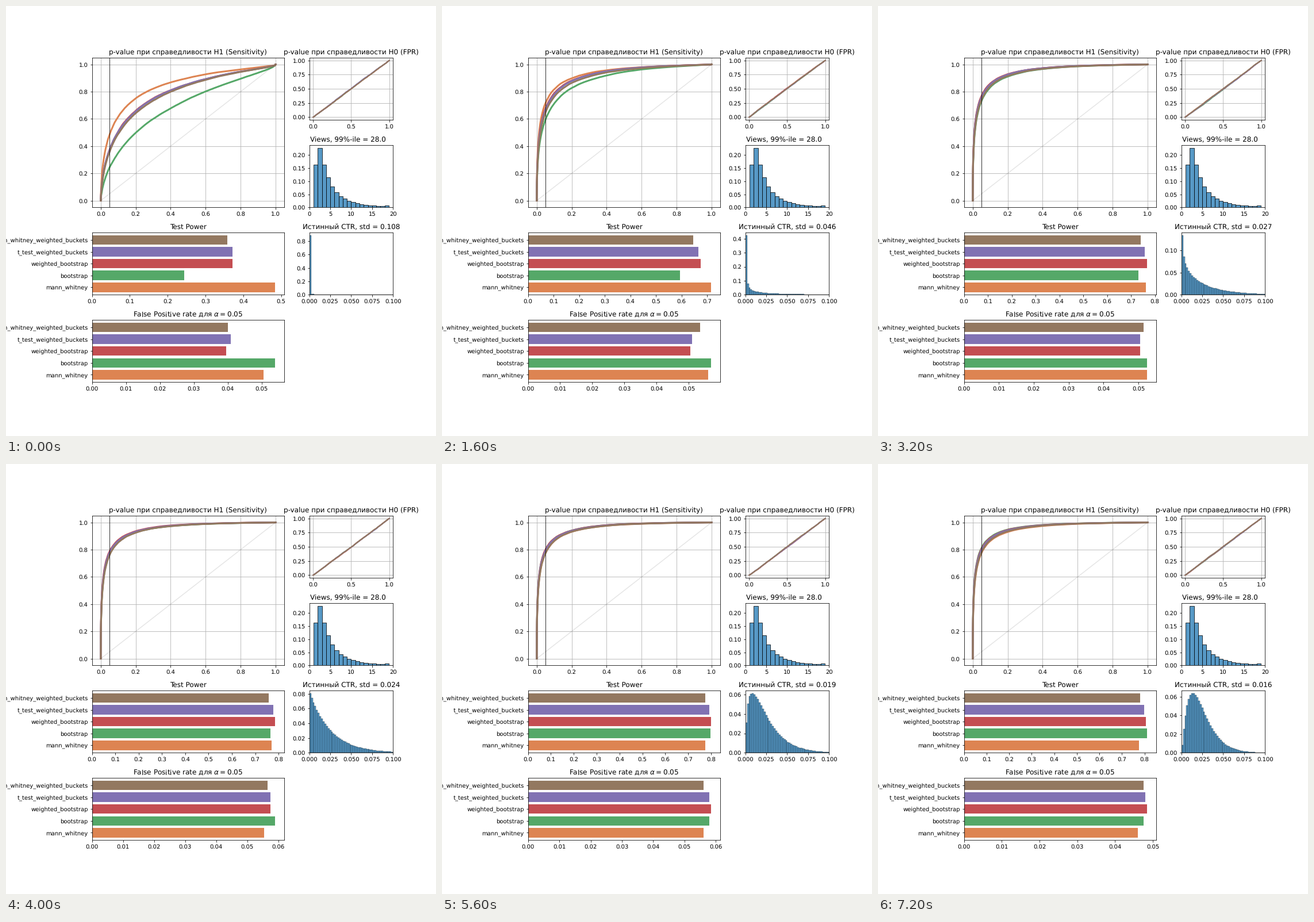
Recreate the animation shown at these times as a matplotlib script. Size 748 by 748 pixels, loop 8000 ms.

```python
import math

import numpy as np
import matplotlib.pyplot as plt
from matplotlib.animation import FuncAnimation
from matplotlib.colors import to_rgba

plt.rcParams["font.family"] = "DejaVu Sans"
plt.rcParams["text.hinting"] = "none"

DPI = 72
SIDE = 748.01 / DPI
STEPS = 10
ALPHA = 0.05
MEAN_CTR = 0.0243
HIST_FACE = to_rgba("#1f77b4", 0.75)

# Name, colour, first power, final power, rate of approach.
TESTS = [
    ("mann_whitney", "#dd8452", 0.484, 0.775, 0.80),
    ("bootstrap", "#55a868", 0.243, 0.820, 0.47),
    ("weighted_bootstrap", "#c44e52", 0.372, 0.807, 0.60),
    ("t_test_weighted_buckets", "#8172b3", 0.372, 0.800, 0.58),
    ("mann_whitney_weighted_buckets", "#937860", 0.357, 0.783, 0.57),
]
NAMES = [t[0] for t in TESTS]
COLORS = [t[1] for t in TESTS]

# Steepness and bend of the power curves on the normal-quantile scale.
COMMON_SHAPE = np.array([0.965, 0.073])
OWN_SHAPE = {"mann_whitney": (0.95, 0.085), "bootstrap": (0.89, 0.043)}


def norm_cdf(z):
    return np.array([0.5 * (1 + math.erf(v / math.sqrt(2))) for v in z])


Z = np.linspace(-4, 3.6, 1500)
P = norm_cdf(Z)


def quantile(p):
    return np.interp(p, P, Z)


def to_trials(rates):
    return np.round(np.array(rates) * 2000) / 2000


def powers(i):
    return to_trials([end - (end - start) * math.exp(-rate * i)
                      for _, _, start, end, rate in TESTS])


def false_positives(i):
    level = np.interp(i, [0, 1, 2, 3, 5, 7, 9],
                      [0.0443, 0.055, 0.0522, 0.0434, 0.057, 0.0572, 0.0468])
    fade = math.exp(-i / 3)
    weighted = 0.002 - 0.007 * fade
    offsets = [0.006 * (-1) ** i * math.exp(-i / 4),
               0.0095 * fade,
               weighted,
               weighted + 0.002 * fade - 0.0005,
               -0.0045 * math.cos(i) * math.exp(-i / 6)]
    return to_trials(level + np.array(offsets))


def view_bins():
    """Shares of 1 + floor(lognormal); the last bin holds two counts."""
    cdf = np.r_[0, norm_cdf(np.log(np.arange(1, 20)) - 1)]
    shares = np.diff(cdf) / cdf[-1]
    return np.r_[shares[:17], shares[17:].sum()]


def ctr_bins(i):
    """Bin masses and spread of a beta distribution that tightens by step."""
    b = max(1, 5 * i) if i < 2 else 10 * (i - 1)
    b += 5 * max(0, i - 7)
    a = MEAN_CTR * b / (1 - MEAN_CTR)
    edges = np.linspace(0, 0.1, 51)
    mid = (edges[1:] + edges[:-1]) / 2
    scale = math.exp(math.lgamma(a + b) - math.lgamma(a + 1) - math.lgamma(b))
    mass = 1.035 * scale * np.diff(edges ** a) * (1 - mid) ** (b - 1)
    std = math.sqrt(MEAN_CTR * (1 - MEAN_CTR) / (a + b + 1))
    return edges[:-1], mass, std


def bridge(rng, n=1000):
    walk = np.r_[0, np.cumsum(rng.normal(size=n))] / math.sqrt(n)
    return walk - np.linspace(0, 1, n + 1) * walk[-1]


def sample_noise(p, noise):
    return np.interp(p, np.linspace(0, 1, len(noise)), noise)


def power_curve(power, shape, noise):
    d = Z - quantile(ALPHA)
    y = norm_cdf(quantile(power) + shape[0] * d - shape[1] * d * d)
    wobble = sample_noise(y, noise)
    y = y + wobble - np.interp(ALPHA, P, wobble) * np.exp(-(d / 0.4) ** 2)
    y = np.maximum.accumulate(np.clip(y, 0, 1))
    return np.r_[0, P, 1], np.r_[0, y, 1]


def null_curve(noise):
    x = np.linspace(0, 1, 500)
    y = x + sample_noise(x, noise)
    return x, np.maximum.accumulate(np.clip(y, 0, 1))


fig = plt.figure(figsize=(SIDE, SIDE), dpi=DPI, facecolor="white")
grid = fig.add_gridspec(4, 3, left=0.2, right=0.9, top=0.88, bottom=0.125,
                        wspace=0.3, hspace=0.4)
ax_h1 = fig.add_subplot(grid[:2, :2])
ax_h0 = fig.add_subplot(grid[0, 2])
ax_views = fig.add_subplot(grid[1, 2])
ax_ctr = fig.add_subplot(grid[2, 2])
ax_power = fig.add_subplot(grid[2, :2])
ax_fpr = fig.add_subplot(grid[3, :2])


def draw_curves(i, power):
    rng = np.random.default_rng(40 + i)
    shared_h1, shared_h0 = bridge(rng), bridge(rng)
    blend = min(i / 4, 1) ** 2
    for name, color, p in zip(NAMES, COLORS, power):
        own = np.array(OWN_SHAPE.get(name, COMMON_SHAPE))
        shape = own + (COMMON_SHAPE - own) * blend
        n1 = 0.004 * shared_h1 + 0.004 * bridge(rng)
        n0 = 0.008 * shared_h0 + 0.008 * bridge(rng)
        ax_h1.plot(*power_curve(p, shape, n1), color=color, lw=3)
        ax_h0.plot(*null_curve(n0), color=color, lw=2)
    ax_h1.plot([0, 1], [0, 1], color="k", alpha=0.1, lw=1.5)
    ax_h1.axvline(ALPHA, color="k", lw=0.8)
    for ax in (ax_h1, ax_h0):
        ax.set_xlim(-0.05, 1.05)
        ax.set_ylim(-0.05, 1.05)
        ax.grid(True)
    ax_h1.set_title("p-value при справедливости H1 (Sensitivity)")
    ax_h0.set_title("p-value при справедливости H0 (FPR)")


def draw_bars(ax, values, title):
    ax.barh(range(len(NAMES)), values, color=COLORS)
    ax.set_yticks(range(len(NAMES)), NAMES)
    ax.set_xlim(0, max(values) * 1.05)
    ax.set_title(title)


def draw_hist(ax, left, heights, width, lw, xmax):
    ax.bar(left, heights, width, align="edge", color=HIST_FACE,
           edgecolor="k", lw=lw)
    ax.set_xlim(0, xmax)
    ax.set_ylim(0, max(heights) * 1.05)
    ax.set_xticks(np.linspace(0, xmax, 5))


def draw(i):
    for ax in fig.axes:
        ax.clear()
    power = powers(i)
    draw_curves(i, power)
    draw_bars(ax_power, power, "Test Power")
    draw_bars(ax_fpr, false_positives(i),
              r"False Positive rate для $\alpha = 0.05$")

    draw_hist(ax_views, np.arange(1, 19), view_bins(), 1, 0.75, 20)
    ax_views.set_title(f"Views, 99%-ile = {29 if i == 1 else 28:.1f}", x=0.459)

    left, heights, std = ctr_bins(i)
    draw_hist(ax_ctr, left, heights, 0.002, 0.3, 0.1)
    ax_ctr.set_title(f"Истинный CTR, std = {std:.3f}")
    return []


anim = FuncAnimation(fig, draw, frames=STEPS, interval=800, repeat=True,
                     repeat_delay=0, blit=False)
plt.show()
```
